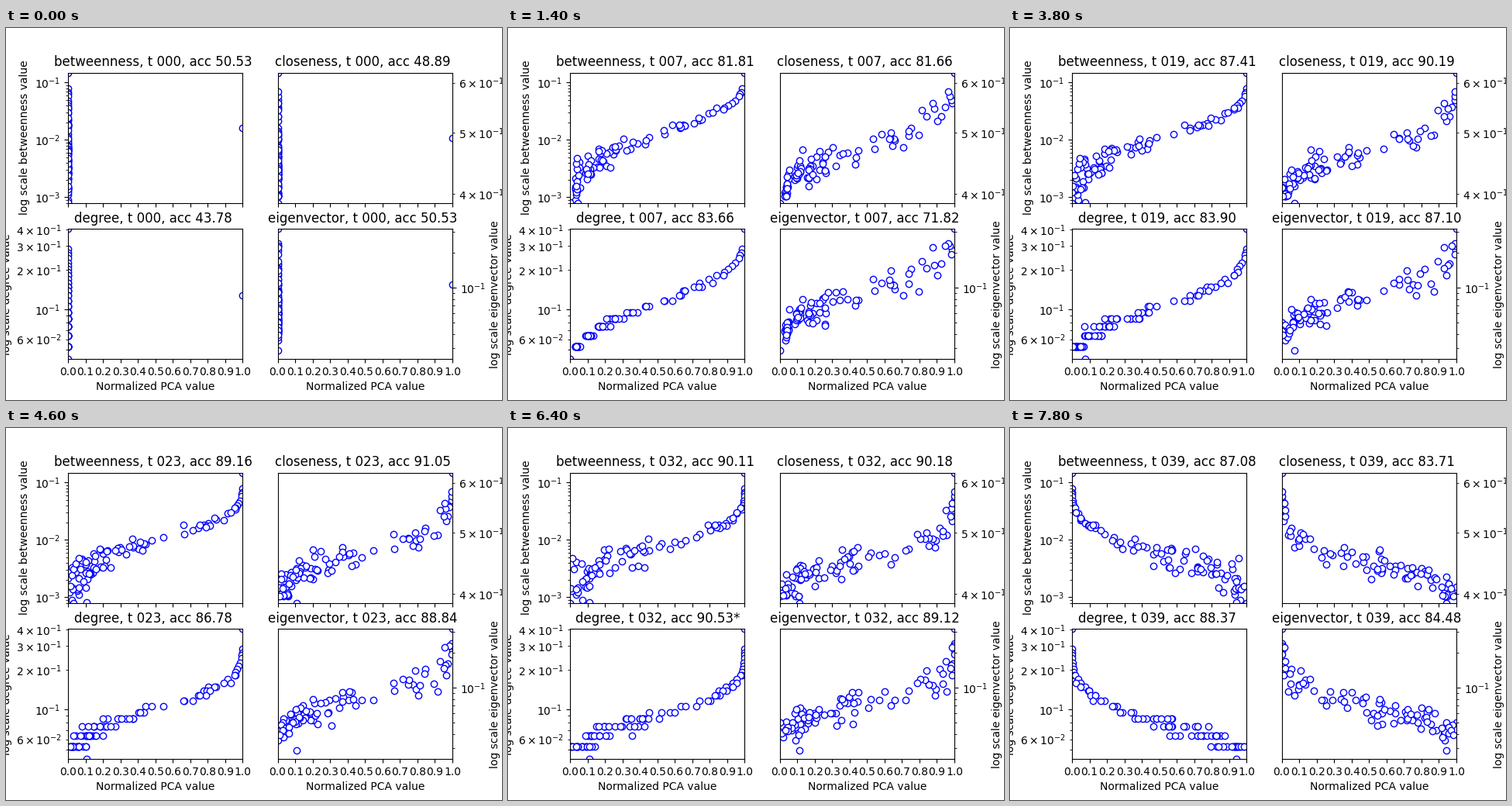
Recreate the animation shown at these times as a matplotlib script. Size 640 by 480 pixels, loop 8 s.

```python
import numpy as np
import matplotlib.pyplot as plt
from matplotlib.animation import FuncAnimation

FRAMES, STEP_MS = 40, 200
NODES = 95
SPREAD_AT, FLIP_AT = 7, 36   # values have spread out; principal axis turns over
AXES_H = 168                 # height of one plot in pixels
rng = np.random.default_rng(5)

# Heavy-tailed degrees, from a few points on the rank curve.
degree = np.round(np.exp(np.interp(
    np.arange(1, NODES + 1),
    [1, 2, 7, 13, 25, 32, 56, 72, 94, 95],
    np.log([38, 27, 20, 15, 11, 8.6, 6.6, 5.55, 4.55, 4]))))
gap = np.log(degree.max() / degree)          # 0 for the hub
seed = int(np.argmax(degree == 12))          # the node that starts alone

pull, jitter_b, jitter_e = rng.normal(size=(3, NODES))
for noise in (pull, jitter_b, jitter_e):
    noise[seed] = 0
phase = rng.uniform(0, 2 * np.pi, NODES)
rate = rng.uniform(.1, .35, NODES)
calm = np.minimum(1, 2 * gap)                # less scatter near the hub


def scale(drop, lo, hi):
    """Turn pixels below the top of a log axis into values."""
    return lo * (hi / lo) ** (1 - np.clip(drop, 0, AXES_H) / AXES_H)


def limits(v):
    return v.min(), v.max()


B_LIM, C_LIM, E_LIM = (8e-4, .149), (94 / 243, 94 / 151), (.0243, .32)
b_drop = 60 * gap + 1.2 * gap ** 4 - 3 * gap ** 2 * (.3 * pull + .95 * jitter_b)
c_drop = 74 * gap ** .93 - 13 * calm * pull
e_drop = 62 * gap - 12 * calm * (.8 * pull + .6 * jitter_e)

# name, values, limits, accuracy at the key times, time of the best one
KEYS = [0, 7, 12, 19, 27, 32, 39]
PANELS = [
    ("betweenness", scale(b_drop, *B_LIM), B_LIM,
     [50.53, 81.81, 80.95, 87.41, 90.91, 90.11, 87.08], 27),
    ("closeness", scale(c_drop, *C_LIM), C_LIM,
     [48.89, 81.66, 84.00, 90.19, 91.90, 90.18, 83.71], None),
    ("degree", degree / 94, limits(degree / 94),
     [43.78, 83.66, 81.56, 83.90, 89.65, 90.53, 88.37], 32),
    ("eigenvector", scale(e_drop, *E_LIM), E_LIM,
     [50.53, 71.82, 81.13, 87.10, 90.59, 89.12, 84.48], 27),
]


def spread(t):
    """Bell-shaped falloff from the hub that steepens and widens with time."""
    width = np.interp(t, [7, 27, 39], [1.45, 1.53, 1.72])
    power = np.interp(t, [12, 30], [3.1, 5.3])
    x = np.exp(-(gap / width) ** power)
    wobble = .8 * pull + .8 * np.sin(phase + rate * t)
    amp = .14 * x * (1 - x) + .1 * (t - SPREAD_AT) / 32 * (1 - x)
    return 1 - np.abs(1 - np.abs(x + amp * wobble))


def pca_values(t):
    x = spread(max(t, SPREAD_AT))
    if t < SPREAD_AT:
        left = (1 - t / SPREAD_AT) ** 3
        x *= 1 - left
        x[seed] += left
    lo, hi = limits(x)
    x = (x - lo) / (hi - lo)
    return 1 - x if t >= FLIP_AT else x


fig, axes = plt.subplots(2, 2, sharex="col", figsize=(6.4, 4.8), dpi=100)
dots, titles = [], []
for i, (ax, (name, values, lim, _, _)) in enumerate(zip(axes.flat, PANELS)):
    dots += ax.plot(np.zeros(NODES), values, "bo", markerfacecolor="white")
    ax.set_yscale("log")
    ax.set_ylim(lim)
    ax.set_xlim(0, 1)
    ax.set_xticks(np.arange(11) / 10)
    ax.set_ylabel(f"log scale {name} value")
    if i % 2:
        ax.yaxis.tick_right()
        ax.yaxis.set_label_position("right")
    if i > 1:
        ax.set_xlabel("Normalized PCA value")
    titles.append(ax.set_title(""))


def update(t):
    x = pca_values(t)
    for dot, title, (name, _, _, acc, best) in zip(dots, titles, PANELS):
        dot.set_xdata(x)
        mark = "*" if t == best else " "
        title.set_text(f"{name}, t {t:03d}, acc {np.interp(t, KEYS, acc):.2f}{mark}")
    return dots + titles


anim = FuncAnimation(fig, update, frames=FRAMES, interval=STEP_MS,
                     repeat=True, repeat_delay=0, blit=False)
plt.show()
```
